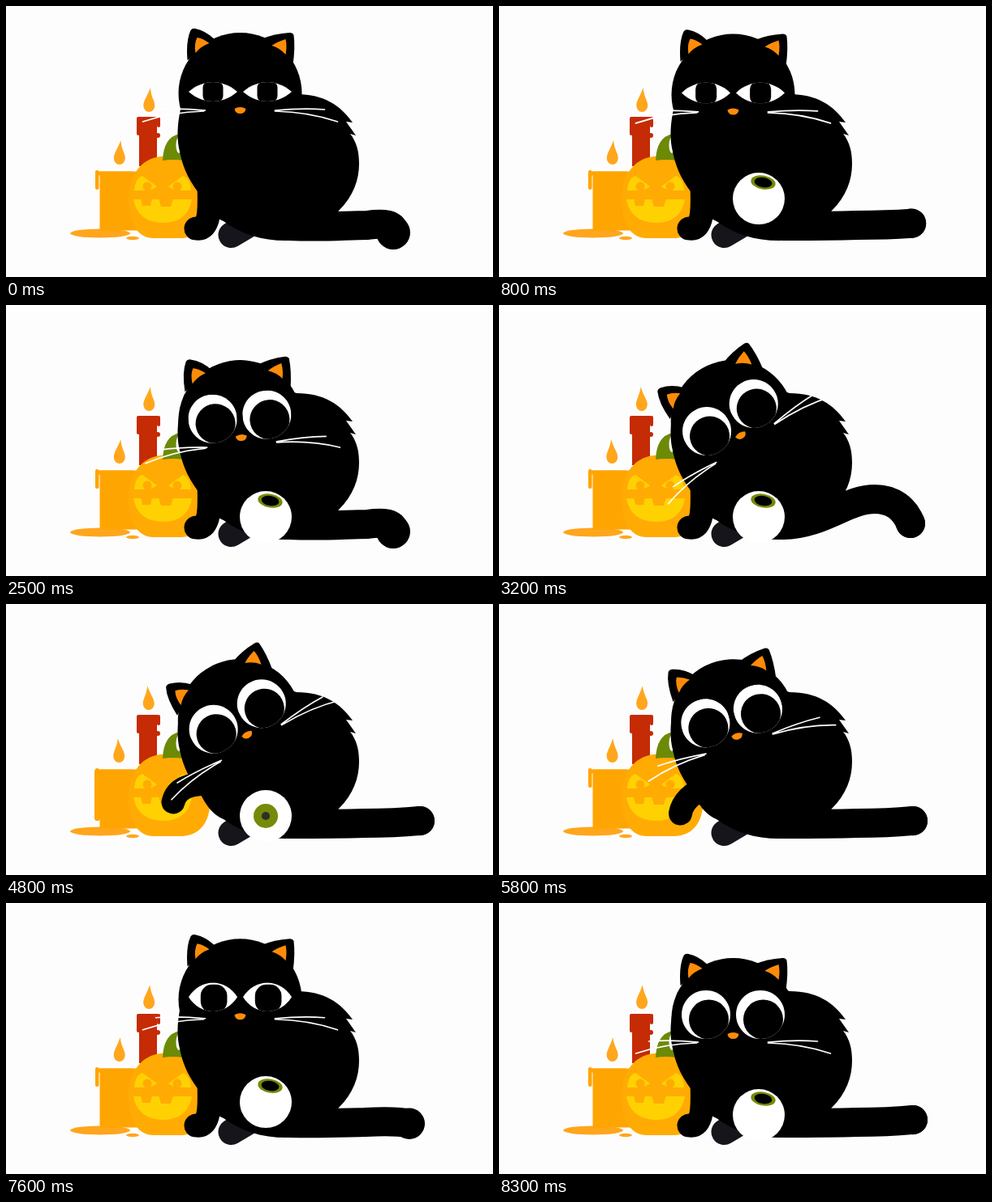
An HTML page for the animation above (8400 ms loop, 600x335 px).

```html
<!DOCTYPE html>
<html lang="en">
<head>
<meta charset="utf-8">
<title>Cat and rolling eyeball</title>
<style>
html, body { margin: 0; width: 100%; height: 100%; overflow: hidden; background: #fefdfe; }
svg { display: block; width: 100%; height: 100%; }
.line { fill: none; stroke-linecap: round; stroke-linejoin: round; }
</style>
</head>
<body>
<svg viewBox="0 0 600 335">
  <defs>
    <clipPath id="stage"><rect x="4" width="592" height="335"/></clipPath>
    <clipPath id="lids"><path id="lidShape"/></clipPath>
  </defs>

  <g fill="#ffa61c">
    <ellipse cx="116" cy="281" rx="37" ry="5.5"/>
    <ellipse cx="156" cy="287" rx="8" ry="2.2"/>
    <path id="flameLow"/>
    <path id="flameHigh"/>
  </g>
  <g fill="#c52b05">
    <rect x="164" y="138" width="22" height="60"/>
    <rect x="162" y="137" width="26" height="9" rx="2"/>
    <rect x="161" y="137" width="4" height="23" rx="2"/>
    <rect x="186" y="137" width="4" height="13" rx="2"/>
    <circle cx="187" cy="160" r="3"/>
  </g>
  <g fill="#ffa502">
    <rect x="115.5" y="204.5" width="49" height="73"/>
    <rect x="112" y="204.5" width="46" height="5" rx="2"/>
    <rect x="110" y="203" width="4.5" height="24" rx="2"/>
    <rect id="drip" x="109" width="7" rx="3"/>
  </g>

  <path fill="#ffab04" d="M200 186C230 181 252 203 252 238C252 272 238 287 214 287H182C162 287 151 268 151 238C151 205 172 183 200 186Z"/>
  <path fill="#6c8a06" d="M193 191Q194 162 214 158L219 191Q206 189 193 191Z"/>
  <ellipse cx="213" cy="172" rx="3.5" ry="10" fill="#fff"/>
  <g fill="#ffd103">
    <path d="M158 228Q159 213 168 210L186 223Q182 227 172 228Z"/>
    <path d="M228 228Q227 213 218 210L200 223Q204 227 214 228Z"/>
    <path d="M157 239H229Q224 268 193 268Q162 267 157 239Z"/>
  </g>
  <g fill="#ffab04">
    <circle cx="174" cy="223" r="5.5"/>
    <circle cx="211" cy="223" r="5.5"/>
    <path d="M166 238H180L178 247H168ZM188 238H206L203 248H191Z"/>
  </g>

  <path class="line" d="M277.5 283L296 272" stroke="#17151c" stroke-width="32"/>
  <path id="tail" class="line" stroke="#000" stroke-width="36"/>
  <circle id="tailTip"/>
  <path d="M220 110C210 140 210 165 214 180C219 205 228 218 238 232C248 252 256 261 268 266C290 282 315 290 345 290C378 288 398 268 410 253C428 235 435 215 435 195C435 180 432 168 424 158L431 160L419 143L427 144C412 123 392 109 358 109L300 90Z"/>
  <path id="arm" class="line" stroke="#000" stroke-width="29"/>

  <g id="head">
    <ellipse cy="5" rx="76" ry="75"/>
    <path d="M-65 -36Q-67 -60 -61 -73Q-59 -76 -55 -75Q-41 -72 -30 -60Z"/>
    <path d="M65 -30Q68 -52 66 -67Q65 -70 61 -70Q42 -69 26 -62Z"/>
    <g fill="#ff8c08">
      <path d="M-55 -45Q-57 -56 -53 -64Q-46 -63 -38 -57Q-49 -53 -55 -45Z"/>
      <path d="M56 -43Q58 -54 56 -62Q46 -59 39 -54Q49 -51 56 -43Z"/>
      <path d="M-7 24Q0 20 7 24Q6 30 0 30Q-6 30 -7 24Z"/>
    </g>
    <g id="leftEye">
      <g clip-path="url(#lids)"><rect x="-32" y="-32" width="64" height="64" fill="#fff"/><rect class="pupil"/></g>
    </g>
    <g id="rightEye">
      <g clip-path="url(#lids)"><rect x="-32" y="-32" width="64" height="64" fill="#fff"/><rect class="pupil"/></g>
    </g>
    <g class="line" stroke="#fff" stroke-width="1.7">
      <path id="leftWhiskers" d="M-43 34Q-77 31 -104 33M-45 35Q-85 36 -120 48"/>
      <path id="rightWhiskers" d="M43 34Q77 31 104 33M43 35Q85 36 120 48"/>
    </g>
  </g>

  <g clip-path="url(#stage)">
    <g id="ball">
      <circle r="32" fill="#fff"/>
      <g id="iris"><ellipse id="irisRing" fill="#758a08"/><ellipse id="irisDot"/></g>
    </g>
  </g>
</svg>
<script>
const LOOP = 8400, STORY = 6700;
const el = id => document.getElementById(id);
const set = (node, attrs) => { for (const k in attrs) node.setAttribute(k, attrs[k]); };
const mix = (a, b, p) => Array.isArray(a) ? a.map((v, i) => mix(v, b[i], p)) : a + (b - a) * p;
const smooth = p => p * p * (3 - 2 * p);
const pupils = document.querySelectorAll('.pupil');

// keys: [time, value] pairs, eased between neighbours
function track(t, keys) {
  if (t <= keys[0][0]) return keys[0][1];
  for (let i = 1; i < keys.length; i++) {
    const [t0, a] = keys[i - 1], [t1, b] = keys[i];
    if (t < t1) return mix(a, b, smooth((t - t0) / (t1 - t0)));
  }
  return keys[keys.length - 1][1];
}

// tail poses: two joined cubics and the tip radius
const CURLED = [390, 274, 420, 271, 445, 271, 465, 268, 480, 270, 477, 280, 21];
const FLAT = [390, 272, 410, 272, 440, 271, 465, 271, 490, 270, 510, 268, 18];
const WAVED = [400, 271, 428, 240, 463, 240, 485, 240, 500, 252, 507, 270, 18];
const TAIL = [[300, CURLED], [750, FLAT], [1100, CURLED], [1500, FLAT], [1900, FLAT], [2500, CURLED],
  [3150, WAVED], [3250, WAVED], [3600, FLAT], [6000, FLAT], [6450, CURLED]];

const STANDING = [250, 220, 251, 250, 252, 278, 234, 275];
const HALFWAY = [253, 228, 240, 232, 226, 244, 223.5, 259];
const RAISED = [252, 222, 225, 222, 210, 228, 206, 245];
const ARM = [[3800, STANDING], [4100, HALFWAY], [4450, RAISED], [5450, RAISED], [5800, HALFWAY], [6100, STANDING]];

const ALERT = [[750, 0], [1150, 1], [5850, 1], [6250, 0]];
const TILT = [[2300, 0], [3150, 30.5], [4400, 30.5], [4750, 28], [5450, 28], [6200, 0]];

function drawFlame(id, x, bottom, sway) {
  const tip = bottom - 30, mid = bottom - 8, cx = x + sway * 0.3;
  el(id).setAttribute('d', `M${x + sway * 2} ${tip}C${cx + 2} ${tip + 11} ${cx + 7} ${mid - 6} ${cx + 7} ${mid}` +
    `A7 8 0 0 1 ${cx - 7} ${mid}C${cx - 7} ${mid - 6} ${cx - 2} ${tip + 10} ${x + sway * 2} ${tip}Z`);
}

function drawHead(t) {
  const open = track(t, ALERT), tilt = track(t, TILT), lean = tilt / 30;
  set(el('head'), { transform: `translate(${288.5 - 3.5 * lean} ${103 + 35 * open + lean}) rotate(${-tilt})` });

  const [side, sx, tx, h] = mix([9, 20, 8, 12], [16.6, 30, 16.6, 30], open);
  set(el('lidShape'), { d: `M-30 0C${-sx} ${-side} ${-tx} ${-h} 0 ${-h}S${sx} ${-side} 30 0` +
    `C${sx} ${side} ${tx} ${h} 0 ${h}S${-sx} ${side} -30 0Z` });
  for (const [id, s] of [['leftEye', -1], ['rightEye', 1]])
    set(el(id), { transform: `translate(${33.5 * s} ${3 * (1 - open)})` });

  const a = tilt * Math.PI / 180, c = Math.cos(a), s = Math.sin(a);
  const [rx, ry, round] = mix([12.5, 14, 9], [24.5, 24.5, 24.5], open);
  const px = open * (3.5 * c - 6 * s), py = open * (3.5 * s + 6 * c);
  for (const p of pupils)
    set(p, { x: px - rx, y: py - ry, width: 2 * rx, height: 2 * ry, rx: round });

  const rise = -8 * (1 - open);
  set(el('leftWhiskers'), { transform: `translate(0 ${rise + 5 * lean})` });
  set(el('rightWhiskers'), { transform: `translate(0 ${rise}) rotate(${-5 * lean} 43 34)` });
}

function ballPosition(t) {
  const floor = 262, arc = (start, length, height) => {
    const p = (t - start) / length;
    return floor - 4 * height * p * (1 - p);
  };
  if (t > 5050) return [320 + 0.5 * (t - 5050), floor];
  if (t >= 950) return [320, floor];
  if (t >= 703) return [320, arc(703, 247, 25)];
  return [320 - 0.637 * (703 - t), arc(t < 243 ? -217 : 243, 460, 169)];
}

function drawBall(t) {
  const [x, y] = ballPosition(t), front = track(t, [[3750, 0], [4400, 1]]);
  const [ix, iy, rx, ry, turn, dot] = mix([5.5, -20, 15.3, 8.5, 10, 0.72], [0, 0, 15, 15, 0, 0.34], front);
  set(el('ball'), { transform: `translate(${x} ${y})`, visibility: t > 5560 ? 'hidden' : 'visible' });
  set(el('iris'), { transform: `translate(${ix} ${iy}) rotate(${turn})` });
  set(el('irisRing'), { rx, ry });
  set(el('irisDot'), { rx: rx * dot, ry: ry * dot, fill: `rgb(${mix([0, 0, 0], [42, 48, 44], front).map(Math.round)})` });
}

function draw(now) {
  const t = (now % LOOP) % STORY;
  const sway = Math.cos(t / 420 * 2 * Math.PI);
  drawFlame('flameHigh', 176, 131, sway);
  drawFlame('flameLow', 139.5, 196, sway);
  const dripEnd = track(t, [[3800, 227], [4800, 268], [5300, 277]]);
  const dripTop = track(t, [[4800, 204], [5300, 276]]);
  set(el('drip'), { y: dripTop, height: t < 3800 || t > 5300 ? 0 : dripEnd - dripTop });

  const tail = track(t, TAIL);
  set(el('tail'), { d: `M350 272C${tail.slice(0, 6)}C${tail.slice(6, 12)}` });
  set(el('tailTip'), { cx: tail[10], cy: tail[11], r: tail[12] });
  const arm = track(t, ARM);
  set(el('arm'), { d: `M${arm.slice(0, 2)}C${arm.slice(2)}` });
  drawHead(t);
  drawBall(t);
}

const start = performance.now();
function tick() {
  draw(performance.now() - start);
  requestAnimationFrame(tick);
}
tick();
</script>
</body>
</html>
```
